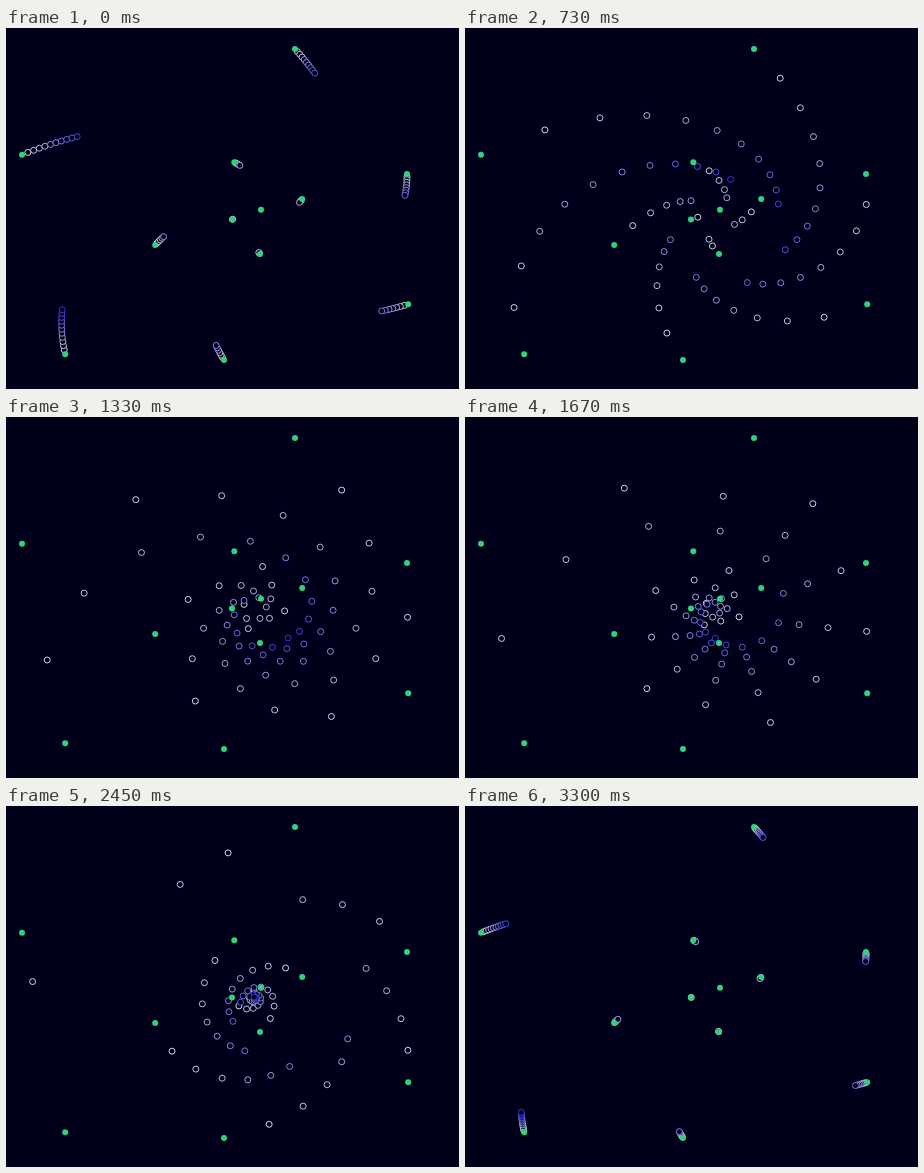
Recreate the animation shown at these times as an HTML page with a canvas. Size 453 by 361 pixels, loop 3330 ms.

```html
<!DOCTYPE html>
<html lang="en">
<head>
<meta charset="utf-8">
<title>De Casteljau points</title>
<style>
html, body { margin: 0; height: 100%; overflow: hidden; background: #00001a; }
canvas { display: block; }
</style>
</head>
<body>
<canvas id="stage" width="453" height="361"></canvas>
<script>
const ctx = document.getElementById('stage').getContext('2d');
const BG = '#00001a', GREEN = '#2bd47d';
const LOOP = 3330, TICK = 30;

// Control points, from the centre of the spiral outwards
const control = [
  [255, 181.7], [226, 191.5], [254, 226], [296.2, 171], [228.3, 134.2], [149.2, 217],
  [218, 332], [402.2, 276.2], [401, 146], [289, 21], [16, 126.7], [59.2, 326.2]
];

// Key times in ms and curve parameters
const pace = [
  [0, .0214], [420, .1504], [1000, .312], [1670, .525], [2060, .6345], [2450, .755], [LOOP, 1.0214]
];

const mix = (a, b, t) => a + (b - a) * t;

function paramAt(ms) {
  const i = pace.findIndex(p => p[0] > ms);
  const [m0, t0] = pace[i - 1], [m1, t1] = pace[i];
  const held = Math.floor((ms - m0) / TICK) * TICK;
  return mix(t0, t1, held / (m1 - m0)) % 1;
}

function dot([x, y], fill, stroke) {
  ctx.beginPath();
  ctx.arc(x, y, 3, 0, 2 * Math.PI);
  ctx.fillStyle = fill;
  ctx.fill();
  if (stroke) {
    ctx.strokeStyle = stroke;
    ctx.stroke();
  }
}

function draw(now) {
  const t = paramAt(now % LOOP);
  ctx.fillStyle = BG;
  ctx.fillRect(0, 0, 453, 361);
  ctx.lineWidth = 0.95;

  // Each level interpolates between neighbours of the level before
  let points = control;
  for (let level = 1; level < control.length; level++) {
    const prev = points;
    points = prev.slice(1).map(([x, y], i) => [mix(x, prev[i][0], t), mix(y, prev[i][1], t)]);
    const c = 243 - 17 * level;
    points.forEach(p => dot(p, BG, `rgb(${c},${c},230)`));
  }
  control.forEach(p => dot(p, GREEN));
}

const start = performance.now();
function loop() {
  draw(performance.now() - start);
  requestAnimationFrame(loop);
}
loop();
</script>
</body>
</html>
```
